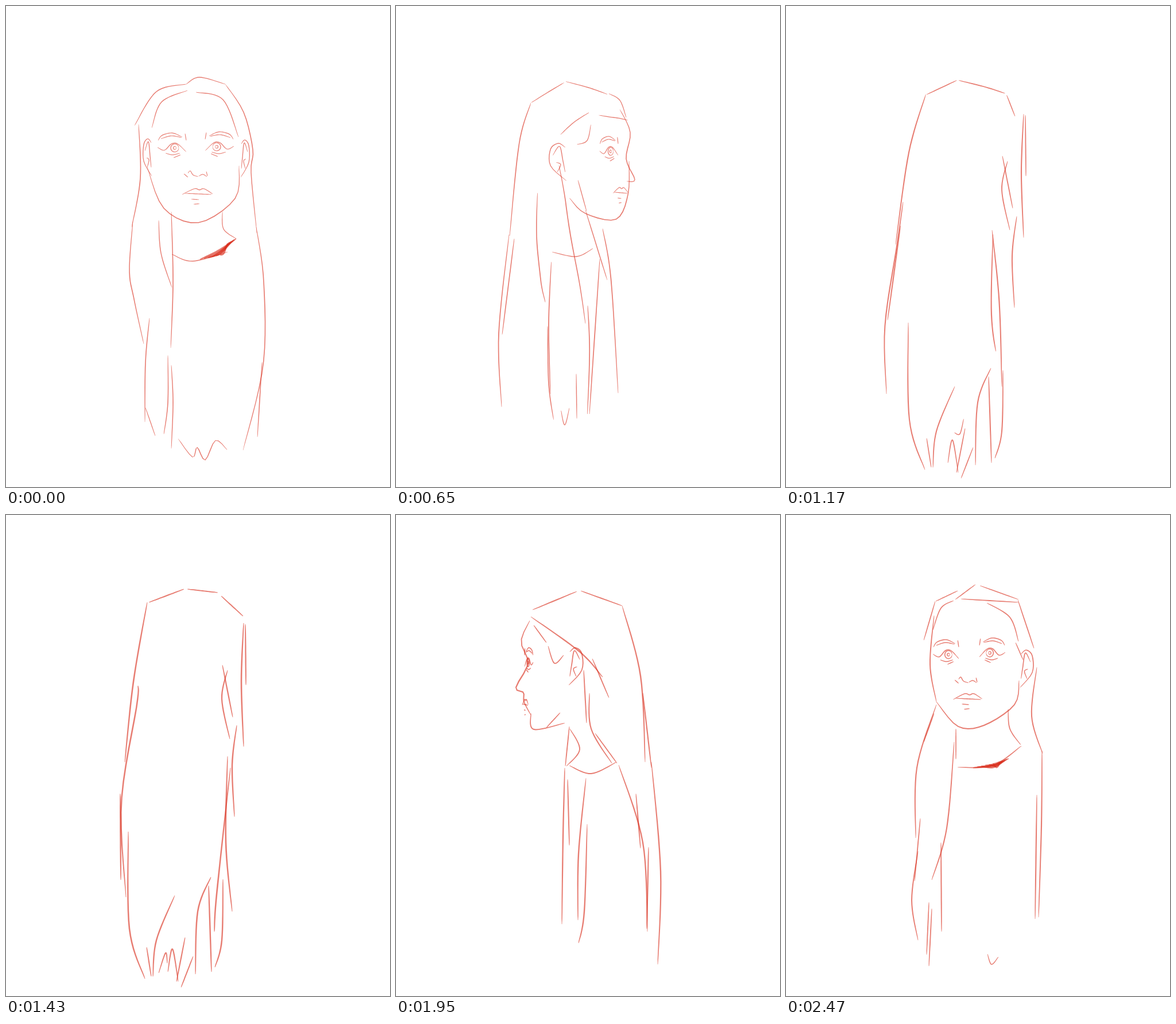
Write an HTML page that moves like this. It is 669 px wide and 837 px high and loops after 2600 ms.

```html
<!DOCTYPE html>
<html lang="en">
<head>
<meta charset="utf-8">
<title>Turning portrait sketch</title>
<style>
html, body { margin: 0; width: 100%; height: 100%; overflow: hidden; background: #fff; }
svg { display: block; width: 100vw; height: 100vh; }
</style>
</head>
<body>
<svg id="stage" viewBox="0 0 669 837" fill="#d92c1a" fill-opacity=".62"></svg>
<script>
const STEP = 130, STEPS = 20, SAMPLES = 20;
const mix = (a, b, t) => a + (b - a) * t;

function spline(a, b, c, d, t) {
  return b + t / 2 * (c - a + t * (2 * a - 5 * b + 4 * c - d + t * (3 * (b - c) + d - a)));
}

// Even samples along a smooth curve through a few points.
function curve(points) {
  const last = points.length - 1;
  const at = i => points[Math.max(0, Math.min(last, i))];
  return Array.from({ length: SAMPLES + 1 }, (_, k) => {
    const u = k / SAMPLES * last, i = Math.min(last - 1, Math.floor(u));
    return [0, 1].map(axis => spline(...[-1, 0, 1, 2].map(n => at(i + n)[axis]), u - i));
  });
}

const parse = text => text.split("|").map(stroke =>
  curve(stroke.split(" ").map(pair => pair.split(",").map(Number))));

const ring = r => Array.from({ length: SAMPLES + 1 }, (_, i) => {
  const angle = i / SAMPLES * 2 * Math.PI;
  return [r * Math.cos(angle), r * Math.sin(angle)];
});

const eye = [
  ...parse("-29,-13 -22,-22 -4,-26 13,-19|-24,-16 -6,-21 12,-18|18,-25 20,-13"),
  ...parse("-30,-1 -18,4 -6,-7 5,-7 20,7|-16,9 -4,12 9,9|-2,17 10,12"),
  ring(7), ring(2.5)
];
const nose = parse("-14,-4 -10,-8 -5,-1 4,2|5,1 12,-2 19,2|-21,-3 -14,3|18,-7 20,1");
const mouth = parse("-26,0 -5,-10 4,-8 12,-10 27,-1|-21,-2 2,-1 25,0|-10,8 3,9|-6,17 4,16");
const ear = parse("16,28 -12,2 -12,-27 2,-37 14,-30|-8,-16 4,-32 10,-7 14,13|-2,-4 6,0 0,13");
const shapes = { eyeL: eye, eyeR: eye, nose, mouth, earL: ear, earR: ear };

const front = {
  crown: "224,208 262,149 314,136|314,136 337,124 382,136",
  hairline: "254,212 271,167 316,147|331,150 378,163 405,228",
  side: "382,136 414,185 430,250 427,290 437,395",
  left: "231,206 234,300 219,385|221,375 215,460 223,510 240,588|250,543 243,620 242,724",
  right: "436,385 449,480 448,625 413,773|446,620 438,750",
  jaw: "246,280 275,352 335,377 399,335 406,278",
  neck: "377,358 379,388 401,405",
  collar: "289,432 325,444 386,428",
  inner: "266,373 270,430 289,490|288,358 291,480 287,595|282,608 282,690 275,745|288,625 291,690 288,770",
  tips: "300,753 325,785 333,768 347,790 365,756 385,772|243,699 260,748"
};

const rightTurn = {
  crown: "231,180 265,158 300,137|306,133 342,138|348,136 392,142 417,180",
  hairline: "297,184 320,167 355,154|350,142 385,163 416,185|317,171 308,205 287,224|262,257 274,270 286,235",
  left: "229,181 223,260 221,400|216,410 211,560 227,710|212,530 216,685",
  right: "388,415 389,490 416,712",
  jaw: "270,306 303,353 387,372 418,300 416,205",
  neck: "353,373 352,405 368,416|383,375 382,407",
  collar: "320,445 358,442 375,418",
  inner: "272,310 312,415 345,570 350,675|230,368 241,470 275,570 305,606|298,563 320,640 336,745|312,590 320,700 342,755|354,613 361,742",
  tips: "254,720 266,742|300,733 330,741"
};

const rightProfile = {
  crown: "241,156 285,130|286,130 345,148 394,169|394,169 385,208",
  hairline: "276,264 317,217|357,238 391,212|362,242 358,263 344,258",
  left: "241,156 206,220 175,400|178,385 147,580 141,685|200,280 154,458",
  right: "332,360 360,460 358,635|330,355 368,477",
  jaw: "335,363 380,370 396,335|402,305 416,302 401,266 408,220 390,180|317,303 332,357",
  collar: "224,411 270,430 311,426",
  inner: "296,245 278,310 310,430|263,283 215,425|243,328 212,470 202,605|216,525 207,685|314,430 317,520 306,678|355,440 337,710|314,640 315,718",
  tips: "321,688 328,727 338,657"
};

const back = {
  crown: "249,152 310,129|316,129 369,135|375,141 413,176",
  side: "414,188 410,290 414,403|417,190 418,296",
  left: "246,152 222,290 207,430|230,297 228,330 201,500 209,665|199,485 200,635|213,551 215,720 242,807",
  right: "386,420 383,570 394,690|391,440 367,660 363,725|378,634 376,740 364,787|402,366 394,435 398,525",
  locks: "377,261 395,352|386,270 376,320 390,390|294,662 262,740 256,803|357,630 334,690 330,799|353,645 358,795",
  tips: "266,797 278,762 281,780|282,795 290,755 300,812|312,735 297,812|305,822 326,768|245,752 253,803"
};

const leftProfile = {
  crown: "238,165 315,133|322,132 394,158",
  hairline: "235,177 320,238 360,282|240,192 262,222|265,228 276,258 292,244",
  side: "394,158 426,280 434,430|430,310 445,440",
  right: "445,430 461,620 456,782|388,435 430,570 438,725|418,485 426,580|440,578 437,720",
  front: "294,440 291,560 289,712|299,460 302,575",
  jaw: "235,345 240,373 294,362|233,184 218,220 230,258 209,300 222,309 223,325 235,348|262,370 286,344",
  neck: "303,372 320,408 297,437|337,310 340,372 376,432|347,380 385,432|302,368 295,437|327,270 332,362|342,250 371,318",
  collar: "302,436 340,450 384,430",
  inner: "331,458 318,590 317,705|333,538 328,690 318,745"
};

const leftTurn = {
  crown: "241,170 310,131|312,131 388,143",
  hairline: "229,190 270,162 328,193|294,180 300,200 350,226|329,224 345,260 372,250|373,220 419,270",
  side: "387,142 424,215 462,390|463,390 467,445",
  right: "466,420 469,520 450,682|472,515 464,660 470,742",
  front: "278,380 240,540 220,652|272,400 257,488|223,640 219,728",
  jaw: "242,342 255,375 290,368 331,344|228,192 226,230 234,255 218,287 235,303 240,335",
  neck: "293,368 318,390 295,437|388,290 388,350 445,406|390,342 425,388",
  collar: "295,438 345,456 400,428 442,406",
  inner: "295,453 272,590 271,735|403,432 402,520 420,648|417,558 424,650 434,767",
  tips: "235,680 243,768|264,682 255,760"
};

const nearFront = {
  crown: "261,150 299,132|338,123 405,147|295,147 330,121",
  hairline: "256,200 270,162 292,149|305,146 405,152|350,153 390,178 405,220|400,222 413,252",
  side: "404,148 432,232|437,265 428,350 447,415",
  right: "446,410 445,540 440,700|437,487 434,703",
  front: "262,330 228,440 226,562|258,345 240,395|234,528 224,637|230,585 219,670 230,740|260,150 240,218",
  jaw: "262,325 300,368 345,366 398,330 406,288|258,175 251,260 262,325",
  neck: "296,372 296,425|387,338 390,372 409,400",
  collar: "299,439 360,436 410,402",
  inner: "293,395 280,545 254,635|270,570 271,725",
  tips: "249,674 245,765|254,685 249,785|351,764 358,782 370,769"
};

// Each feature is placed by x, y and a horizontal scale; below zero is mirrored.
function features(lines) {
  const placed = {};
  for (const [name, x, y, scale] of lines)
    placed[name] = shapes[name].map(stroke => stroke.map(([u, v]) => [x + u * scale, y + v]));
  return placed;
}

// Overlapping strokes that darken the inside of the collar.
const hatch = (x0, y0, x1, y1) => Array.from({ length: 6 }, (_, k) => curve([
  [x0 + k * 7, y0 - k * 1.5],
  [mix(x0, x1, .5) + k * 2, mix(y0, y1, .5) + 3 + k % 3 * 2],
  [x1 - k * 3, y1 + k * 1.5]
]));

function pose(at, width, sketch, face = [], shade) {
  const parts = features(face);
  for (const name in sketch) parts[name] = parse(sketch[name]);
  if (shade) parts.shade = hatch(...shade);
  return { at, width, parts };
}

const keys = [
  pose(0, 1.5, front, [
    ["eyeL", 294, 247, 1], ["eyeR", 367, 245, -1], ["nose", 331, 295, 1],
    ["mouth", 333, 328, 1], ["earL", 246, 268, .5], ["earR", 417, 270, -.5]
  ], [338, 441, 401, 405]),
  pose(3, 1.6, rightTurn, [
    ["eyeL", 351, 246, 1], ["eyeR", 408, 250, -.55], ["nose", 388, 297, .8],
    ["mouth", 383, 323, .8], ["earL", 248, 280, .95]
  ]),
  pose(7, 1.5, rightProfile, [
    ["eyeL", 397, 260, .3], ["mouth", 399, 329, .2], ["earL", 314, 272, 1]
  ]),
  pose(11, 2.3, back),
  pose(15, 2.1, leftProfile, [
    ["eyeR", 230, 257, -.3], ["mouth", 225, 331, .2], ["earR", 314, 268, -.8]
  ]),
  pose(17, 1.9, leftTurn, [
    ["eyeR", 267, 243, -.9], ["nose", 240, 295, .6], ["mouth", 248, 327, .5],
    ["earR", 385, 268, -1]
  ]),
  pose(19, 1.9, nearFront, [
    ["eyeL", 283, 243, .9], ["eyeR", 355, 240, -.9], ["nose", 314, 290, .95],
    ["mouth", 316, 321, .95], ["earR", 420, 272, -.75]
  ], [326, 440, 388, 424])
];

// Outline of a pencil line that thins towards both ends; long lines are heavier.
function inkPath(points, width) {
  const length = points.slice(1).reduce((sum, [x, y], i) =>
    sum + Math.hypot(x - points[i][0], y - points[i][1]), 0);
  const weight = width * (.75 + Math.min(length, 180) / 500);
  const edge = side => points.map(([x, y], i) => {
    const [x0, y0] = points[Math.max(0, i - 1)];
    const [x1, y1] = points[Math.min(SAMPLES, i + 1)];
    const pressure = .3 + .7 * Math.sqrt(Math.abs(Math.sin(Math.PI * i / SAMPLES)));
    const k = side * weight * pressure / 2 / (Math.hypot(x1 - x0, y1 - y0) || 1);
    return (x - (y1 - y0) * k).toFixed(1) + " " + (y + (x1 - x0) * k).toFixed(1);
  });
  return `<path d="M${[...edge(1), ...edge(-1).reverse()].join("L")}Z"/>`;
}

const blend = (a, b, t) => a.map((p, i) => p.map((v, axis) => mix(v, b[i][axis], t)));

// Shared strokes move between two poses; the rest belong to the nearer one.
function drawing(step) {
  const i = keys.findLastIndex(key => key.at <= step);
  const from = keys[i], to = keys[i + 1] || from;
  const t = to === from ? 0 : (step - from.at) / (to.at - from.at);
  const width = mix(from.width, to.width, t);
  let markup = "";
  for (const name in { ...from.parts, ...to.parts }) {
    const a = from.parts[name] || [], b = to.parts[name] || [];
    for (let n = 0; n < Math.max(a.length, b.length); n++) {
      const both = a[n] && b[n];
      if (!both && (a[n] ? t >= .5 : t < .5)) continue;
      const stroke = both ? blend(a[n], b[n], t) : a[n] || b[n];
      markup += inkPath(stroke, name === "shade" ? 3.6 : width);
    }
  }
  return markup;
}

const drawings = Array.from({ length: STEPS }, (_, step) => drawing(step));
const stage = document.getElementById("stage");
const start = performance.now();
let shown = -1;

function render() {
  const step = Math.floor((performance.now() - start) / STEP) % STEPS;
  if (step !== shown) stage.innerHTML = drawings[shown = step];
  requestAnimationFrame(render);
}
render();
</script>
</body>
</html>
```
